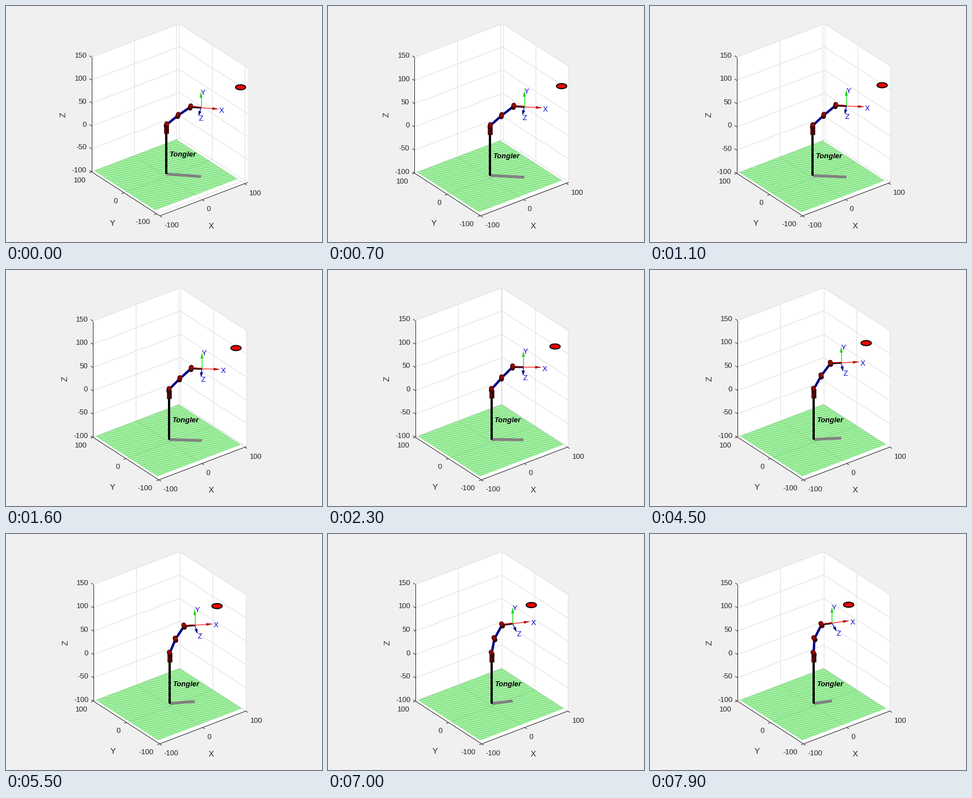
Write a matplotlib script that moves like this. It is 560x420 px and loops after 8000 ms.

```python
import numpy as np
import matplotlib.pyplot as plt
from matplotlib.animation import FuncAnimation
from matplotlib.collections import PolyCollection
from matplotlib.patches import Polygon

W, H = 560, 420
FRAMES, STEP = 80, 100
PT = 0.72  # points per pixel at 100 dpi

plt.rcParams["font.family"] = "Liberation Sans"
fig = plt.figure(figsize=(W / 100, H / 100), dpi=100, facecolor="#f0f0f0")
ax = fig.add_axes([0, 0, 1, 1])

AZ, EL = np.radians(37.5), np.radians(30)
WIDEN = 1.004
EX = np.array([WIDEN * np.cos(AZ), -np.sin(AZ) * np.sin(EL)])
EY = np.array([-WIDEN * np.sin(AZ), -np.cos(AZ) * np.sin(EL)])
EZ = np.array([0, -np.cos(EL)])

INK = (0.15, 0.15, 0.15)
GRID = (0.87, 0.87, 0.87)
NAVY = (0, 0, 0.52)
BALL_R, BALL_Z = 9.5, 106.5
LINK, SHOULDER, BASE = 31.2, 13.0, -94.3

# Green squares of a checkered floor that ends at the back corner
i, j = np.meshgrid(np.arange(97), np.arange(94))
keep = (i + j) % 2 == 0
TILE_X = 100 - 2 * (i[keep][:, None] + np.array([0, 1, 1, 0]))
TILE_Y = 100 - 2 * (j[keep][:, None] + np.array([0, 0, 1, 1]))


class View:
    """Orthographic view scaled to a fixed height on the stage."""

    def __init__(self, xmax, ymin):
        self.xmax, self.ymin = xmax, ymin
        dx, dy = xmax + 100, 100 - ymin
        self.k = 342 / -(EX[1] * dx + EY[1] * dy + EZ[1] * 250)
        left = 289.5 - self.k * (EX[0] * dx - EY[0] * dy) / 2
        self.corner = np.array([left - self.k * EY[0] * dy, 373.0])

    def __call__(self, x, y, z):
        x, y, z = np.broadcast_arrays(x, y, z)
        rel = ((x + 100)[..., None] * EX + (y - self.ymin)[..., None] * EY
               + (z + 100)[..., None] * EZ)
        return self.corner + self.k * rel


def line(a, b, color, width, z, cap="butt"):
    ax.plot([a[0], b[0]], [a[1], b[1]], color=color, lw=width * PT,
            zorder=z, solid_capstyle=cap)


def label(p, s, size=13, color=INK, z=9, **kw):
    kw = {"ha": "center", "va": "center_baseline", **kw}
    ax.text(p[0], p[1], s, fontsize=size * PT, color=color, zorder=z, **kw)


def unit(v):
    return v / np.hypot(*v)


def arrow(a, b, color, head, length, half):
    d = unit(b - a)
    n = np.array([-d[1], d[0]])
    neck = b - d * length
    line(a, neck, color, 1.3, 7)
    ax.add_patch(Polygon([b, neck + n * half, neck - n * half],
                         fc=head, ec="none", zorder=7.1))


def draw_box(P):
    xm, ym = P.xmax, P.ymin
    outline = [P(-100, 100, 150), P(xm, 100, 150), P(xm, ym, 150),
               P(xm, ym, -100), P(-100, ym, -100), P(-100, 100, -100)]
    ax.add_patch(Polygon(outline, fc="white", ec="none", zorder=0))
    for z in range(-100, 151, 50):
        line(P(-100, 100, z), P(xm, 100, z), GRID, 1, 1)
        line(P(xm, 100, z), P(xm, ym, z), GRID, 1, 1)
    for v in (-100, 0, 100):
        line(P(v, 100, -100), P(v, 100, 150), GRID, 1, 1)
        line(P(v, 100, -100), P(v, ym, -100), GRID, 1, 1)
        line(P(xm, v, -100), P(xm, v, 150), GRID, 1, 1)
        line(P(-100, v, -100), P(xm, v, -100), GRID, 1, 1)
    ax.add_collection(PolyCollection(
        P(TILE_X, TILE_Y, -100), facecolors=(0.16, 0.83, 0.16),
        edgecolors="none", linewidths=0, zorder=2))

    left, front = P(-100, 100, -100), P(-100, ym, -100)
    for a, b in ((left, P(-100, 100, 150)), (left, front),
                 (front, P(xm, ym, -100))):
        line(a, b, INK, 1, 3)
    for v in (-100, 0, 100):
        p = P(v, ym, -100)
        line(p, p - 4.5 * unit(EY), INK, 1, 3)
        label(p + [7.5, 16], str(v), ha="left")
        p = P(-100, v, -100)
        line(p, p - 4.5 * unit(EX), INK, 1, 3)
        label(p + [-11.2, 14], str(v), ha="right")
    for v in range(-100, 151, 50):
        p = P(-100, 100, v)
        line(p, p + 4.5 * unit(EY), INK, 1, 3)
        label(p + [-9, -3.4], str(v), ha="right")
    label((363, 390), "X", 14.7)
    label(((left[0] + front[0]) / 2 - 24, 385.5), "Y", 14.7)
    label((left[0] - 49.7, 192.7), "Z", 14.7, rotation=90, va="center")


def joint(p, axis):
    """Short cylinder seen from above, lit at its far end."""
    far, near = p - axis, p + axis
    line(far, near, (0.2, 0, 0), 8.5, 6, "round")
    line(far, p, (0.36, 0.02, 0.02), 7, 6, "round")
    ax.plot(*(far + [0, -0.3]), "o", ms=6.6 * PT, mew=0,
            color=(0.56, 0.03, 0.03), zorder=6.1)


def draw_arm(P, t, heading):
    c, s = heading
    polar = lambda r, z: P(r * c, r * s, z)
    a1 = np.radians(45.5 + 2.4 * t + 0.366 * t * t)
    a2 = np.radians(41 + 4 * t - 0.135 * t * t)
    r1, z1 = LINK * np.cos(a1), SHOULDER + LINK * np.sin(a1)
    r2, z2 = r1 + LINK * np.cos(a2), z1 + LINK * np.sin(a2)
    r3 = r2 + 20

    foot, hub, shoulder = polar(0, BASE), polar(0, 0), polar(0, SHOULDER)
    elbow, wrist, tool = polar(r1, z1), polar(r2, z2), polar(r3, z2)
    side = P(s, -c, 0) - P(0, 0, 0)

    line(foot, polar(r3, BASE), (0.5, 0.5, 0.5), 5, 4)
    line(foot, hub, "black", 4, 5)
    label(polar(0, -100) + [5, -39.8], "Tongler", color="black",
          ha="left", weight="bold", style="italic")

    # Upright motor housing below the shoulder
    line(shoulder, hub + [0, 5], (0.2, 0, 0), 8.5, 5.5)
    line(shoulder + [-1, 0], hub + [-1, 3.5], (0.34, 0.02, 0.02), 4.5, 5.5)
    line(shoulder, elbow, NAVY, 4.2, 5.8)
    line(elbow, wrist, NAVY, 4.2, 5.8)
    line(wrist, tool, (0.13, 0, 0.05), 3.2, 5.9)
    for p in (shoulder, elbow, wrist):
        joint(p, side * 4.5)
    line(wrist + [3, -1.5], tool + [0, -1], (0.9, 0.1, 0.1), 1.2, 6.5)

    tip_x, tip_y = polar(r3 + 34, z2), polar(r3, z2 + 35)
    tip_z = tool + 32 * side
    arrow(tool, tip_z, (0, 0, 0.8), (0, 0, 0.5), 9, 2.7)
    arrow(tool, tip_y, (0, 0.9, 0), (0.1, 0.82, 0.1), 11, 2.5)
    arrow(tool, tip_x, (1, 0.1, 0.1), (0.7, 0.08, 0.08), 12, 2.4)
    for p, off, name in ((tip_x, (5, 2), "X"), (tip_y, (4, 1), "Y"),
                         (tip_z, (4, 3.5), "Z")):
        label(p + off, name, color=(0, 0, 0.8))


def draw(n):
    t = n * STEP / 1000
    bx = 98 - 1.97 * t - 0.32 * t * t
    by = -100.5 + 12.81 * t - 0.403 * t * t
    P = View(max(100, bx + BALL_R), min(-100, by - BALL_R))

    ax.clear()
    ax.set(xlim=(-0.5, W - 0.5), ylim=(H - 0.5, -0.5))
    ax.axis("off")
    draw_box(P)
    draw_arm(P, t, unit(np.array([bx, by])))
    a = np.linspace(0, 2 * np.pi, 50)
    ring = P(bx + BALL_R * np.cos(a), by + BALL_R * np.sin(a), BALL_Z)
    ax.add_patch(Polygon(ring, fc=(0.93, 0, 0), ec="black", lw=1.8 * PT,
                         zorder=8))
    return []


anim = FuncAnimation(fig, draw, frames=FRAMES, interval=STEP,
                     init_func=lambda: [], repeat=True, repeat_delay=0)
plt.show()
```
